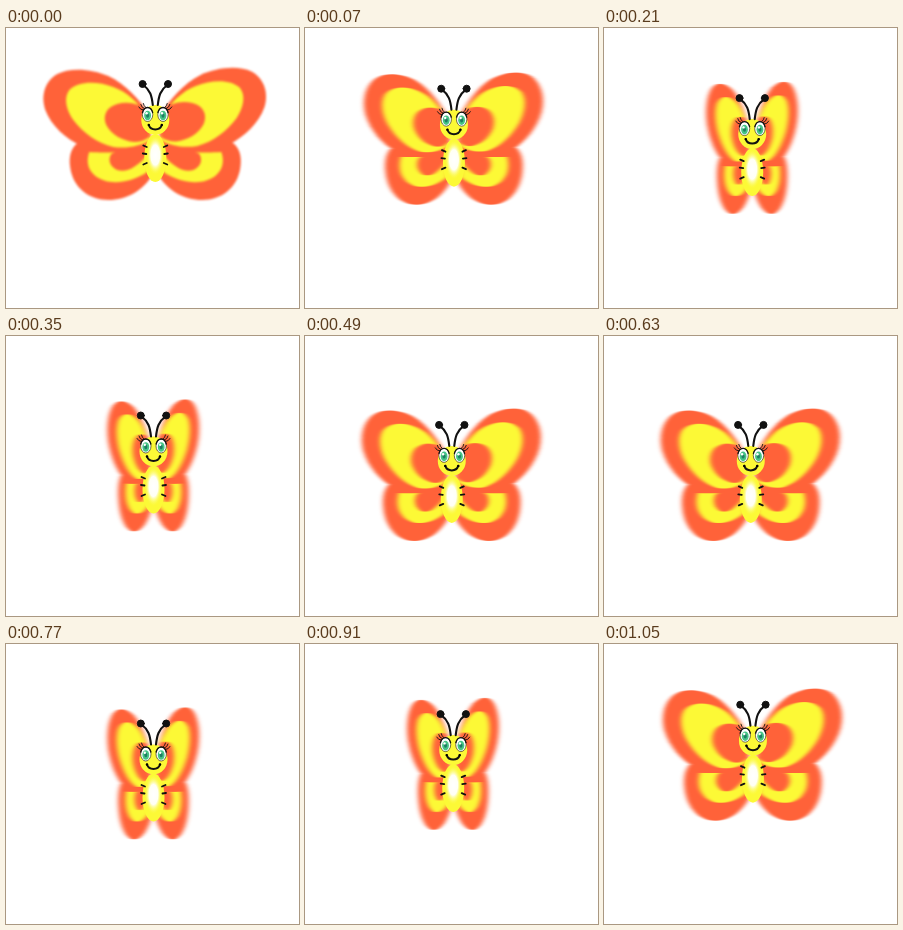
Write an HTML page that moves like this. It is 293 px wide and 280 px high and loops after 1120 ms.

```html
<!DOCTYPE html>
<html>
<head>
<meta charset="utf-8">
<style>
  html, body { margin: 0; width: 100%; height: 100%; overflow: hidden; background: #fff; }
  svg { display: block; width: 293px; height: 280px; }
</style>
</head>
<body>
<svg viewBox="0 0 293 280">
  <defs>
    <filter id="soft" filterUnits="userSpaceOnUse" x="0" y="0" width="293" height="280" color-interpolation-filters="sRGB">
      <feGaussianBlur id="blur" stdDeviation="0.8 0.8"/>
    </filter>
    <radialGradient id="belly">
      <stop offset="0" stop-color="#fff"/>
      <stop offset=".5" stop-color="#fffff4"/>
      <stop offset="1" stop-color="#fcf936" stop-opacity="0"/>
    </radialGradient>
    <!-- Left wings, x measured from the body axis -->
    <g id="lower">
      <path fill="#ff6239" d="M-4 113C-25 111-60 110-74 113C-84 117-87 128-85 140C-82 160-66 172-47 172C-28 172-12 162-3 147Z"/>
      <path fill="#fcf936" d="M-8 123C-26 124-52 125-66 124C-69 132-68 141-61 147C-50 157-28 157-8 144Z"/>
      <path fill="#ff6239" d="M-10 121C-22 120-38 122-44 126C-48 132-45 139-38 142C-29 145-18 139-8 127Z"/>
    </g>
    <g id="upper">
      <path fill="#ff6239" d="M-5 88C-16 71-30 56-47 48C-63 41-85 39-98 46C-110 53-115 67-110 82C-104 98-89 111-74 118C-53 126-26 124-4 115Z"/>
      <path fill="#fcf936" d="M-8 89C-16 75-28 64-42 59C-58 53-77 53-86 62C-92 70-89 82-82 92C-72 105-58 115-42 119C-28 121-15 118-5 112Z"/>
      <path fill="#ff6239" d="M-8 83C-16 75-28 73-38 76C-49 79-53 88-49 97C-44 107-32 113-21 114C-15 114-10 112-6 109Z"/>
    </g>
    <g id="eye">
      <ellipse rx="5.2" ry="7" fill="#fff" stroke="#111" stroke-width=".6"/>
      <ellipse cy="1" rx="3.4" ry="4.8" fill="#45c486"/>
      <ellipse cy="1" rx="1.5" ry="2.2" fill="#1f7d63"/>
      <circle cx="-1" cy="-1.2" r="1.2" fill="#fff"/>
      <path d="M-5.200 -1.500Q-4 -7 0 -7Q4 -7 5.200 -1.500" fill="none" stroke="#111" stroke-width="1.3"/>
    </g>
    <g id="side" fill="none" stroke="#111" stroke-linecap="round">
      <path stroke-width="2.1" d="M-2.500 77C-3.500 68-5 62-12 57"/>
      <circle cx="-12.7" cy="56" r="3.5" fill="#111" stroke-width="1"/>
      <path stroke-width=".9" d="M-12 82Q-15 82-16.500 79M-11 80.500Q-14 79.500-14.500 76.500M-9.500 79.500Q-11.500 78-12 75.500"/>
      <path stroke-width="1.8" d="M-8.500 119L-12 117.500M-9 126L-12.500 125.500M-8.500 135L-12 136.500"/>
    </g>
  </defs>
  <g filter="url(#soft)">
    <g id="wings">
      <use href="#lower"/>
      <use href="#lower" transform="scale(-1 1)"/>
      <use href="#upper"/>
      <use href="#upper" transform="scale(-1 1) rotate(1.5 -4 115)"/>
    </g>
  </g>
  <g id="body">
    <ellipse cy="130" rx="11" ry="24" fill="#fcf936"/>
    <ellipse cy="127" rx="9" ry="20" fill="url(#belly)"/>
    <ellipse cy="92" rx="14" ry="15" fill="#fcf936"/>
    <use href="#side"/>
    <use href="#side" transform="scale(-1 1)"/>
    <use href="#eye" x="-7.700" y="86.500"/>
    <use href="#eye" x="7.700" y="86.500"/>
    <path d="M-6.500 97Q-5 101.500 0 101.500Q5 101.500 6.500 97" fill="none" stroke="#111" stroke-width="2" stroke-linecap="round"/>
    <circle cx="-6.500" cy="97" r="1.2"/>
    <circle cx="6.500" cy="97" r="1.2"/>
  </g>
</svg>
<script>
  const STEP = 70, STEPS = 16, HALF = 8;
  const [wings, body, blur] = ['wings', 'body', 'blur'].map(id => document.getElementById(id));
  const start = performance.now();
  let last = -1;

  function pose(step) {
    const drop = Math.min(step, STEPS - step);   // 0 at the top, 8 at the bottom
    const fold = Math.min(drop, HALF - drop);    // 0 open, 4 closed
    const x = 149.3 - 0.36 * drop;
    const y = 4.7 * drop;
    const place = `translate(${x} ${y})`;
    body.setAttribute('transform', place);
    wings.setAttribute('transform', `${place} scale(${1 - 0.196 * fold} 1)`);
    blur.setAttribute('stdDeviation', fold ? '2.8 0.6' : '0.8 0.8');
  }

  function tick() {
    const step = Math.floor(Math.max(0, performance.now() - start) / STEP) % STEPS;
    if (step !== last) pose(last = step);
    requestAnimationFrame(tick);
  }
  tick();
</script>
</body>
</html>
```
